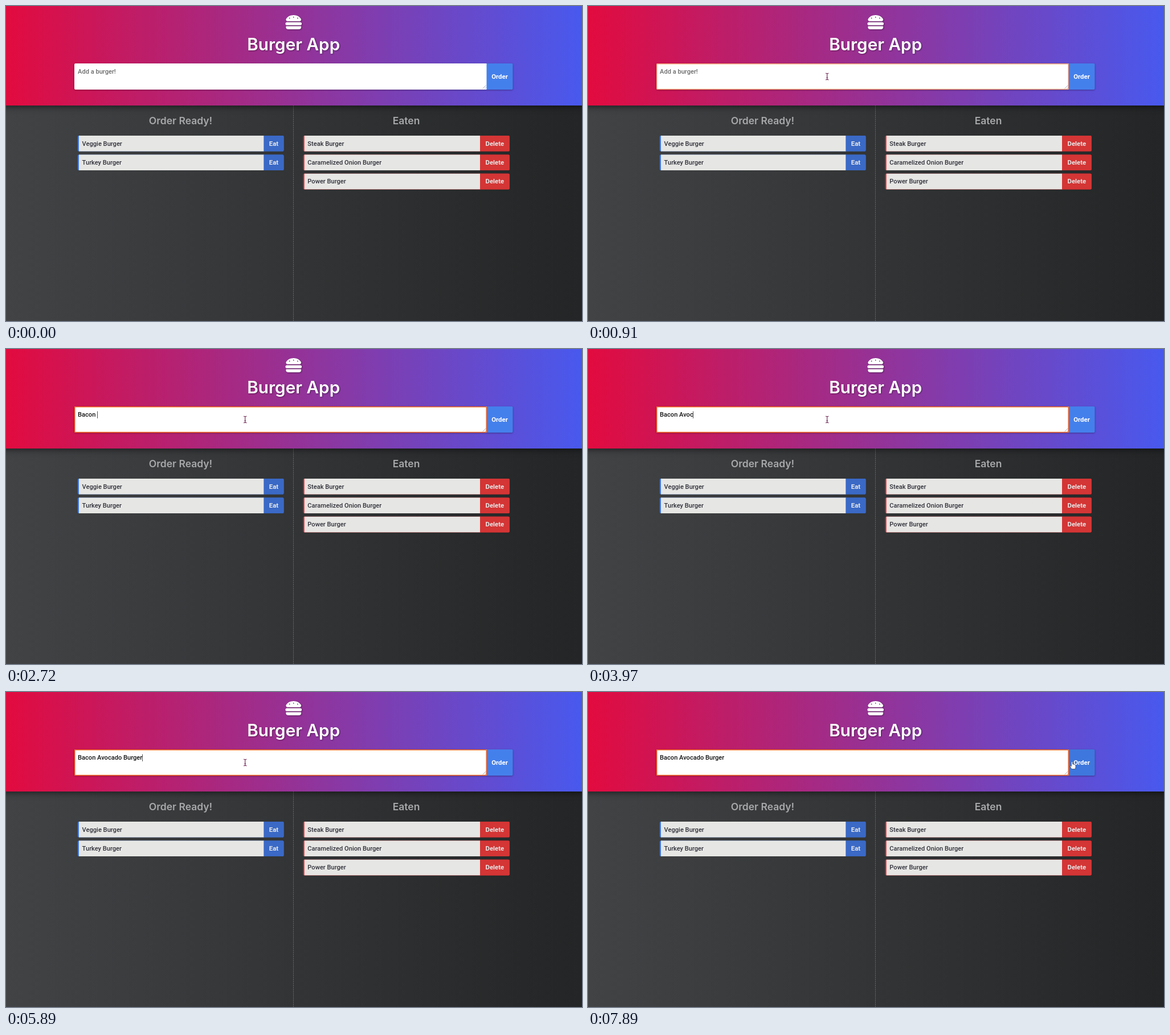
These frames come from a looping animation (1011x554 px, 7990 ms). An HTML page:

```html
<!DOCTYPE html>
<html lang="en">
<head>
<meta charset="utf-8">
<title>Burger App</title>
<style>
  html, body { margin: 0; width: 100%; height: 100%; overflow: hidden; background: #323436; }
  svg { display: block; width: 1011px; height: 554px; }
  text { font: 500 11.1px Roboto, sans-serif; white-space: pre; }
  .title { font: 600 29.7px Inter, sans-serif; fill: #fff; text-anchor: middle; }
  .head { font: 600 17.5px Inter, sans-serif; fill: #a7a8a9; text-anchor: middle; }
  .btn { font-weight: 700; font-size: 11.4px; text-anchor: middle; }
  .lift { filter: drop-shadow(1.5px 1.5px 1.2px rgba(0, 0, 0, .4)); }
  .field { filter: drop-shadow(0 1px 1.5px rgba(0, 0, 0, .35)); }
  .bar { filter: drop-shadow(0 2px 6px rgba(0, 0, 0, .55)); }
</style>
</head>
<body>
<svg viewBox="0 0 1011 554">
  <defs>
    <linearGradient id="sky"><stop stop-color="#e20b3f"/><stop offset="1" stop-color="#4859ee"/></linearGradient>
    <linearGradient id="night"><stop stop-color="#414345"/><stop offset="1" stop-color="#232526"/></linearGradient>
  </defs>
  <rect width="1011" height="554" fill="url(#night)"/>
  <path d="M504.5 175V554" stroke="#6c6d6e" stroke-dasharray="2 1.4"/>
  <g class="bar"><rect x="-20" y="-20" width="1051" height="195" fill="#333"/></g>
  <rect width="1011" height="175" fill="url(#sky)"/>

  <g class="lift">
    <g transform="translate(490.5 14.2) scale(.0557)" fill="#fff">
      <path fill-rule="evenodd" d="M59 224H453C488 224 508 180 488 148C448 83 360 32 256 32S64 83 24 148C4 180 24 224 59 224Z
        M112 128a16 16 0 1 0 32 0a16 16 0 1 0-32 0Z M240 96a16 16 0 1 0 32 0a16 16 0 1 0-32 0Z M368 128a16 16 0 1 0 32 0a16 16 0 1 0-32 0Z"/>
      <rect y="256" width="512" height="96" rx="48"/>
      <path d="M32 384H480Q496 384 496 400V416Q496 480 432 480H80Q16 480 16 416V400Q16 384 32 384Z"/>
    </g>
    <text class="title" x="504.7" y="78.3">Burger App</text>
  </g>

  <g class="field">
    <path d="M844 101H122Q120 101 120 103V145Q120 147 122 147H844Z" fill="#fff"/>
    <path id="order" d="M843.5 101H887.500Q889.500 101 889.500 103V145Q889.500 147 887.500 147H843.500Z" fill="#4480ec"/>
  </g>
  <path d="M836.500 145.500L842.500 139.500M840.500 145.500L842.500 143.500" stroke="#8a8a8a" stroke-width=".7"/>
  <rect id="ring" x="120.700" y="101.700" width="722.600" height="44.800" rx="1" fill="none" stroke="#f4611c" stroke-width="1.500"/>
  <text class="btn" x="866.500" y="128" fill="#fff">Order</text>
  <text id="typed" x="126" y="119.300"></text>
  <path id="caret" d="M.5 109.500V122" stroke="#222" stroke-width=".8"/>

  <text class="head" x="306.500" y="207.500">Order Ready!</text>
  <text class="head" x="702.500" y="207.500">Eaten</text>
  <g id="lists"></g>

  <g id="cursor">
    <path id="beam" d="M-2.700-5.800Q0-5.800 0-4.300Q0-5.800 2.700-5.800M0-4.500V4.500M-2.700 5.800Q0 5.800 0 4.300Q0 5.800 2.700 5.800M-1.300 2H1.300" fill="none" stroke-width="1.100"/>
    <path id="arrow" d="M0 0V11.500L2.700 9L4.500 13.300L6.500 12.400L4.700 8.300H8.500Z" fill="#000" stroke="#fff" stroke-width=".8"/>
    <path id="hand" d="M-1.200 1Q0-.8 1.200 1V4.500Q2.400 3.700 3.200 5Q4.400 4.300 5 5.600Q6.500 5.300 6.500 7V9.500Q6.500 11 5.300 13H-.8Q-1.500 11-3.300 8.600Q-4 7.200-2.700 7Q-1.900 7-1.200 8.300Z" fill="#fff" stroke="#2a3550" stroke-width=".7"/>
  </g>
</svg>
<script>
const LOOP = 7990;
const $ = id => document.getElementById(id);
const show = (id, on) => $(id).setAttribute('visibility', on ? 'visible' : 'hidden');

function list(names, x, split, end, label, edge, fill) {
  return names.map((name, i) => {
    const y = 228 + i * 33.4, base = y + 17.6;
    return `<rect x="${x}" y="${y}" width="${end - x}" height="27.6" rx="2" fill="${edge}"/>
      <rect x="${x + 2.2}" y="${y}" width="${split - x - 2}" height="27.6" fill="#e6e6e4"/>
      <path d="M${split} ${y}H${end - 2}q2 0 2 2v23.6q0 2-2 2H${split}Z" fill="${fill}"/>
      <text x="${x + 7.8}" y="${base}" fill="#30313a">${name}</text>
      <text class="btn" x="${(split + end) / 2}" y="${base}" fill="#e6e6e6">${label}</text>`;
  }).join('');
}
$('lists').innerHTML =
  list(['Veggie Burger', 'Turkey Burger'], 125.8, 452.5, 487.5, 'Eat', '#3f78e0', '#3a69c6') +
  list(['Steak Burger', 'Caramelized Onion Burger', 'Power Burger'], 521.5, 832, 883.8, 'Delete', '#e3252b', '#d43535');

const phrase = 'Bacon Avocado Burger';
const keys = [1790, 2070, 2250, 2350, 2530, 2720, 3120, 3300, 3400, 3970,
  4160, 4250, 4530, 4710, 5110, 5320, 5510, 5690, 5890, 5890];

const pen = document.createElement('canvas').getContext('2d');
function widthOf(s) {
  pen.font = '500 11.1px Roboto, sans-serif';
  return pen.measureText(s).width;
}

// time, x, y, pointer shape
const entry = [
  [70, 748, 381, 'arrow'], [160, 545, 208, 'arrow'], [250, 429.5, 106, 'beam'],
  [430, 427, 111, 'beam'], [530, 422, 120, 'beam'], [630, 419.7, 124, 'beam']
];
const glide = { from: 7020, to: 7790, steps: 8 };

function pointer(t) {
  if (t >= 7890) return [849.5, 122.5, 'hand'];
  if (t >= glide.to) return [842, 122, 'arrow'];
  if (t >= glide.from) {
    const p = Math.floor((t - glide.from) / (glide.to - glide.from) * glide.steps) / glide.steps;
    const e = p * p * (3 - 2 * p);
    return [419.7 + 424 * e, 124 - 19 * Math.sin(Math.PI * e), 'beam'];
  }
  const now = entry.filter(k => k[0] <= t).pop();
  return now ? now.slice(1) : [0, 0, ''];
}

function draw(t) {
  const count = keys.filter(k => k <= t).length;
  const text = phrase.slice(0, count);
  const typed = $('typed');
  typed.textContent = text || 'Add a burger!';
  typed.setAttribute('fill', text ? '#111' : '#6b6b6b');

  const last = count ? keys[count - 1] : 930;
  show('caret', t >= 910 && Math.floor((t - last) / 570) % 2 === 0);
  $('caret').setAttribute('transform', `translate(${Math.round(126 + widthOf(text) - .5)} 0)`);
  $('ring').setAttribute('opacity', t < 910 ? 0 : t < 1030 ? .6 : 1);
  $('order').setAttribute('fill', t < 7890 ? '#4480ec' : '#3e77dd');

  const [x, y, kind] = pointer(t);
  for (const id of ['beam', 'arrow', 'hand']) show(id, id === kind);
  $('beam').setAttribute('stroke', t < 910 ? '#222' : '#6b2250');
  $('cursor').setAttribute('transform', `translate(${x} ${y})`);
}

function tick() {
  draw(performance.now() % LOOP);
  requestAnimationFrame(tick);
}
tick();
</script>
</body>
</html>
```
